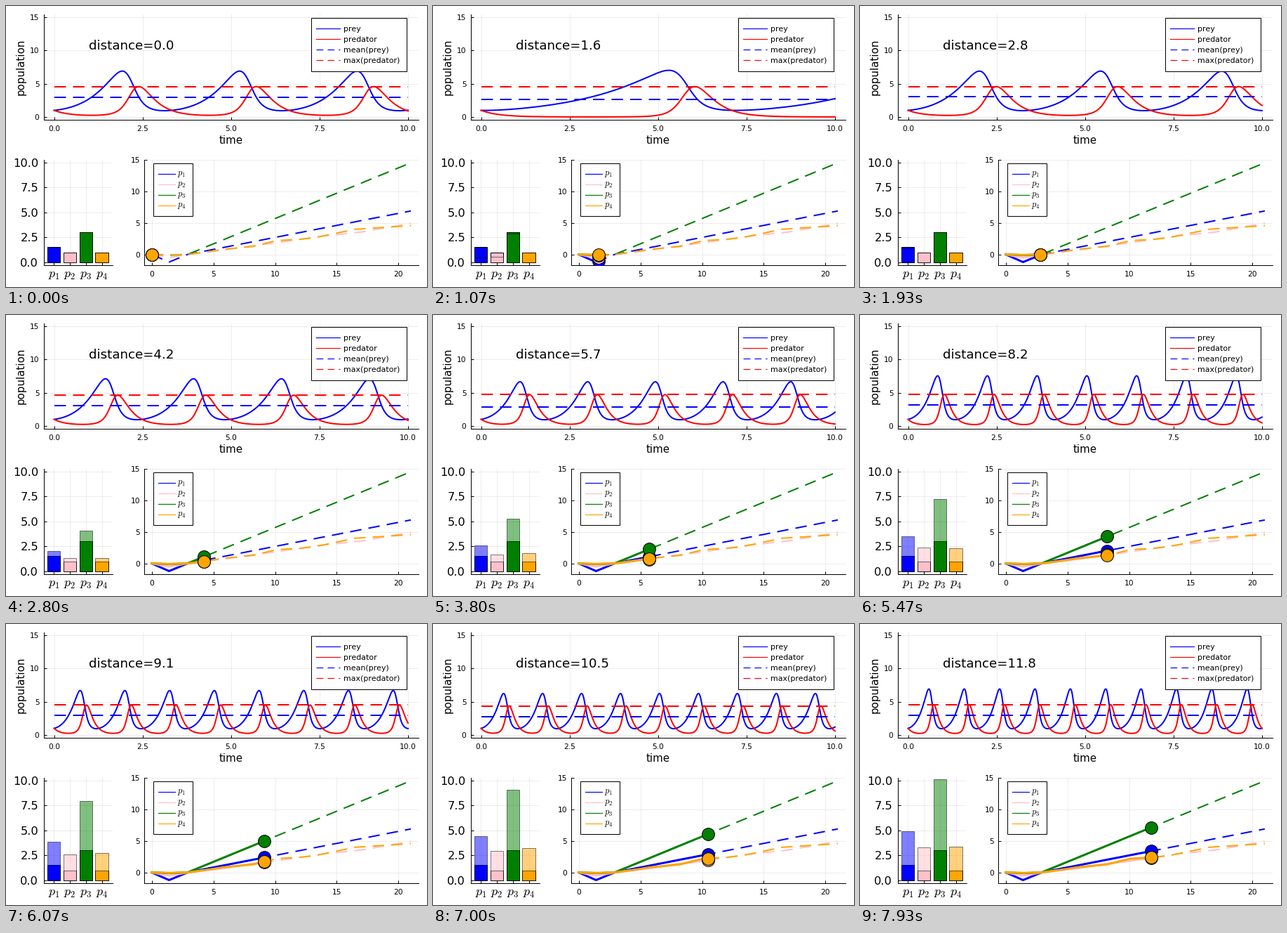
Recreate the animation shown at these times as a matplotlib script. Size 600 px wide and 400 px high, loop 8 s.

```python
import numpy as np
import matplotlib.pyplot as plt
from matplotlib.animation import FuncAnimation
from matplotlib.patches import Rectangle

plt.rcParams["font.family"] = "DejaVu Sans"
plt.rcParams["mathtext.fontset"] = "cm"

W, H, FRAMES, LOOP = 600, 400, 120, 8000
COLORS = ["blue", "pink", "green", "orange"]
NAMES = [f"$p_{i}$" for i in (1, 2, 3, 4)]
BASE = np.array([1.5, 1.0, 3.0, 1.0])
DASH = (0, (8.2, 5.05))

# Each parameter dips, returns to its base value, then grows steadily
DIP_AT, RETURN_AT = 1.4, 2.9
DIP = [-1.21, -0.51, -0.11, -0.067]
SLOPE = [0.382, 0.26, 0.805, 0.264]
# Key points (distance, deviation) of the two wavy curves
WOBBLE = {
    1: [(4.2, 0), (5.7, -0.07), (7.2, 0), (11.9, 0), (13.2, 0.1),
        (17, -0.1), (21, 0.25)],
    3: [(4.2, -0.02), (5.7, 0.06), (8.2, -0.12), (10.1, 0.3), (11.9, 0.01),
        (13.2, -0.06), (16.5, 0.42), (21, -0.2)],
}


def offsets(d):
    rows = []
    for k in range(4):
        row = np.interp(d, [0, DIP_AT, RETURN_AT], [0, DIP[k], 0])
        row = row + SLOPE[k] * np.maximum(d - RETURN_AT, 0)
        if k in WOBBLE:
            row = row + np.interp(d, *zip((RETURN_AT, 0), *WOBBLE[k]))
        rows.append(row)
    return np.array(rows)


def simulate(p, t_end=10.0, steps=1000):
    """Lotka-Volterra by RK4, for all parameter sets at once."""
    def rate(s):
        x, y = s
        return np.array([p[0] * x - p[1] * x * y, p[3] * x * y - p[2] * y])

    h = t_end / steps
    s = np.ones((2, p.shape[1]))
    out = [s]
    for _ in range(steps):
        k1 = rate(s)
        k2 = rate(s + h / 2 * k1)
        k3 = rate(s + h / 2 * k2)
        k4 = rate(s + h * k3)
        s = s + h / 6 * (k1 + 2 * k2 + 2 * k3 + k4)
        out.append(s)
    return np.linspace(0, t_end, steps + 1), np.array(out)


dist = np.arange(FRAMES) * 0.1
params = BASE[:, None] + offsets(dist)
time, states = simulate(params)

fig = plt.figure(figsize=(W / 100, H / 100), dpi=100, facecolor="white")


def px(n):
    return n * 0.72


def panel(x0, y0, x1, y1, xlim, ylim, xticks, yticks):
    ax = fig.add_axes([x0 / W, 1 - y1 / H, (x1 - x0) / W, (y1 - y0) / H])
    ax.set(xlim=xlim, ylim=ylim, xticks=xticks, yticks=yticks)
    ax.set_axisbelow(True)
    ax.grid(color="black", alpha=0.1, lw=px(0.7))
    ax.tick_params(direction="in", length=px(4), width=px(1),
                   labelbottom=False, labelleft=False)
    for side in ("top", "right"):
        ax.spines[side].set_visible(False)
    for side in ("left", "bottom"):
        ax.spines[side].set_linewidth(px(1))
    return ax


quarters = np.arange(5) * 2.5
fives = np.arange(5) * 5
top = panel(53.5, 11.7, 588, 162.3, (-0.3, 10.3), (-0.45, 15.45),
            quarters, fives[:4])
bars = panel(53.5, 218.8, 151.5, 369, (0.367, 4.646), (-0.3, 10.3),
             [1, 2, 3, 4], quarters)
path = panel(196.7, 218.8, 588, 369, (-0.63, 21.63), (-1.71, 15.06),
             fives, fives[:4])

# Overlay in pixel coordinates for labels and legends
over = fig.add_axes([0, 0, 1, 1], zorder=5)
over.set(xlim=(0, W), ylim=(H, 0))
over.axis("off")


def label(x, y, s, size, **kw):
    return over.text(x, y, s, fontsize=px(size), color="black", **kw)


def tick_labels(ax, size, x_base, y_right, x_text, y_text, x_size=None):
    def pixel(x, y):
        p = ax.transData.transform((x, y))
        return p[0], H - p[1]

    for v, s in zip(ax.get_xticks(), x_text):
        label(pixel(v, 0)[0], x_base, s, x_size or size, ha="center")
    for v, s in zip(ax.get_yticks(), y_text):
        label(y_right, pixel(0, v)[1] + 0.365 * size, s, size, ha="right")


def legend(x0, y0, x1, y1, line_x, text_x, rows, size, rise=0):
    over.add_patch(Rectangle((x0, y0), x1 - x0, y1 - y0, fc="white",
                             ec="black", lw=px(1)))
    for i, (name, color, style) in enumerate(rows):
        y = y0 + 15.1 * (i + 1)
        over.plot(line_x, [y, y], color=color, lw=px(1.2), ls=style)
        label(text_x, y + 0.36 * size - rise, name, size)


quarter_text = [f"{v:.1f}" for v in quarters]
five_text = [str(v) for v in fives]
tick_labels(top, 10.67, 178, 47.5, quarter_text, five_text)
tick_labels(bars, 16.3, 386.5, 46, NAMES, quarter_text, x_size=18)
tick_labels(path, 10.67, 385, 191, five_text, five_text)
label(320.5, 195.5, "time", 15, ha="center")
label(21, 87, "population", 15, rotation=90, ha="center", va="center")
caption = label(118, 61.5, "", 18.3)

legend(434.5, 16.5, 570.5, 92.5, (442, 476), 481.5,
       [("prey", "blue", "-"), ("predator", "red", "-"),
        ("mean(prey)", "blue", DASH), ("max(predator)", "red", DASH)], 11)
legend(209.5, 223.5, 265.5, 299, (217, 240.5), 244.5,
       [(n, c, "-") for n, c in zip(NAMES, COLORS)], 12.5, rise=2.5)

prey, = top.plot([], [], color="blue", lw=px(2))
predator, = top.plot([], [], color="red", lw=px(2))
mean_line, = top.plot([0, 10], [0, 0], color="blue", lw=px(2), ls=DASH)
max_line, = top.plot([0, 10], [0, 0], color="red", lw=px(2), ls=DASH)

bar_style = dict(width=0.81, color=COLORS, edgecolor="black", lw=px(1))
bars.bar([1, 2, 3, 4], BASE, **bar_style)
live_bars = bars.bar([1, 2, 3, 4], BASE, alpha=0.5, **bar_style)

full = np.linspace(0, 21, 421)
for row, color in zip(offsets(full), COLORS):
    path.plot(full, row, color=color, lw=px(2), ls=DASH)
trails = [path.plot([], [], color=c, lw=px(3), zorder=3)[0] for c in COLORS]
dots = [path.plot([], [], "o", color=c, ms=px(17.8), mec="black",
                  mew=px(1), zorder=4)[0] for c in COLORS]


def update(i):
    x, y = states[:, 0, i], states[:, 1, i]
    prey.set_data(time, x)
    predator.set_data(time, y)
    mean_line.set_ydata([x.mean()] * 2)
    max_line.set_ydata([y.max()] * 2)
    caption.set_text(f"distance={dist[i]:.1f}")
    walked = np.linspace(0, dist[i], 2 * i + 2)
    rows = offsets(walked)
    for k in range(4):
        live_bars[k].set_height(params[k, i])
        trails[k].set_data(walked, rows[k])
        dots[k].set_data([dist[i]], [rows[k, -1]])
    return [prey, predator, mean_line, max_line, caption,
            *live_bars, *trails, *dots]


anim = FuncAnimation(fig, update, frames=FRAMES, interval=LOOP / FRAMES,
                     repeat=True, repeat_delay=0)
plt.show()
```
